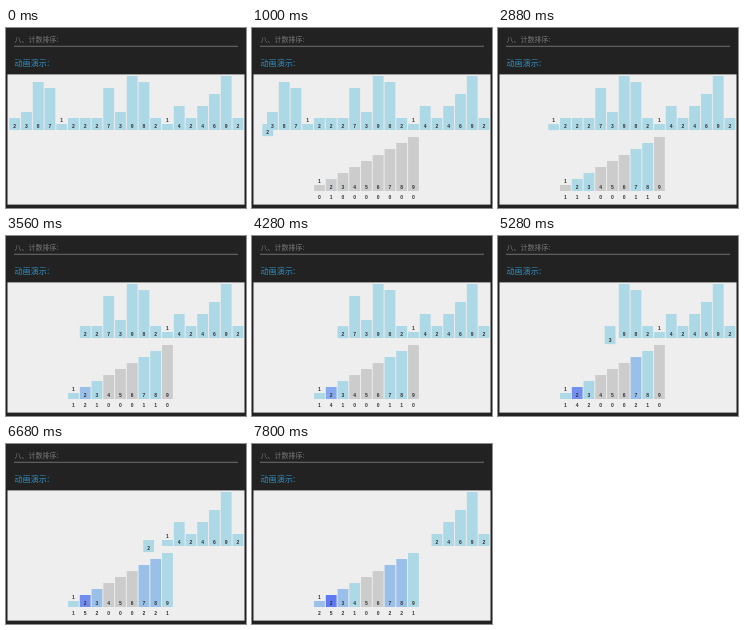
An HTML page that plays this animation: 240x180 px, repeating every 8 s.

```html
<!DOCTYPE html>
<html lang="zh">
<head>
<meta charset="utf-8">
<title>计数排序</title>
<style>
  html, body { margin: 0; width: 100%; height: 100%; overflow: hidden; background: #222; }
  svg { display: block; width: 100%; height: 100%; }
  text { font: bold 5px "Liberation Sans", sans-serif; fill: #333; text-anchor: middle; }
  .head { font-family: "Noto Serif", "Noto Sans CJK SC", serif; text-anchor: start; }
  .title { font-size: 7px; font-weight: 300; fill: #7c7c7c; }
  .sub { font-size: 8.1px; font-weight: 500; fill: #3090c0; }
</style>
</head>
<body>
<svg viewBox="0 0 240 180" preserveAspectRatio="none">
  <rect width="240" height="180" fill="#222"/>
  <text class="head title" x="8.5" y="14">八、计数排序:</text>
  <rect x="8" y="17.8" width="224" height="0.9" fill="#777"/>
  <text class="head sub" x="8.5" y="38">动画演示:</text>
  <rect x="1.5" y="46.4" width="237" height="130.2" fill="#eee"/>
  <g id="bins"></g>
  <g id="bars"></g>
  <g id="labels"></g>
</svg>
<script>
const LOOP = 8000, FIRST = 934, PERIOD = 472, MOVE = 225;
const TOP = 102, BOTTOM = 163, UNIT = 6, PITCH = 11.75, BAR = 10.8;
const values = [2, 3, 8, 7, 1, 2, 2, 2, 7, 3, 9, 8, 2, 1, 4, 2, 4, 6, 9, 2];
const EMPTY = [204, 204, 204], ONE = [173, 216, 230], FULL = [0, 0, 255];

const byId = id => document.getElementById(id);
const mix = (a, b, p) => a + (b - a) * p;
const mixColor = (a, b, p) => a.map((c, i) => mix(c, b[i], p));
const slotX = i => 8.7 + PITCH * i;
const startOf = i => FIRST + PERIOD * i;

function add(parent, tag, attrs) {
  const node = document.createElementNS("http://www.w3.org/2000/svg", tag);
  for (const key in attrs) node.setAttribute(key, attrs[key]);
  return parent.appendChild(node);
}

// A bar with its value, drawn around x = 0 and standing on y = 0.
function makeBar(value, barLayer, labelLayer) {
  const height = value * UNIT;
  const rect = add(barLayer, "rect", { x: -BAR / 2, y: -height, width: BAR, height, fill: "#add8e6" });
  const label = add(labelLayer, "text", { y: value === 1 ? -height - 2.2 : -2.2 });
  label.textContent = value;
  return { value, rect, label };
}

function place(bar, x, y) {
  const move = `translate(${x} ${y})`;
  bar.rect.setAttribute("transform", move);
  bar.label.setAttribute("transform", move);
}

function ease(p) {
  p = Math.min(1, Math.max(0, p));
  return p < 0.5 ? 4 * p ** 3 : 1 - 4 * (1 - p) ** 3;
}

const progress = (t, i) => ease((t - startOf(i)) / MOVE);

const countColor = n => n < 1
  ? mixColor(EMPTY, ONE, n)
  : mixColor(ONE, FULL, (n - 1) / 9);

const bins = Array.from({ length: 9 }, (_, i) => {
  const bin = makeBar(i + 1, byId("bins"), byId("bins"));
  bin.slot = slotX(i + 5);
  place(bin, bin.slot, BOTTOM);
  bin.count = add(byId("bins"), "text", { x: bin.slot, y: 171.2 });
  return bin;
});
const bars = values.map(v => makeBar(v, byId("bars"), byId("labels")));

// The motion is sampled about seven times a second; each sample appears on a 40 ms grid.
function held(t) {
  const step = 141.6, lead = 8.6, grid = 40;
  const pose = Math.floor((Math.floor(t / grid) * grid - lead) / step);
  return Math.max(0, pose * step + lead);
}

function draw(t) {
  byId("bins").setAttribute("opacity", progress(t, -1));

  bars.forEach((bar, i) => {
    const p = progress(t, i);
    const shown = p < 1 ? "visible" : "hidden";
    bar.rect.setAttribute("visibility", shown);
    bar.label.setAttribute("visibility", shown);
    place(bar, mix(slotX(i), bins[bar.value - 1].slot, p), mix(TOP, BOTTOM, p));
  });

  for (const bin of bins) {
    let count = 0, shade = 0;
    values.forEach((v, i) => {
      if (v !== bin.value || t < startOf(i)) return;
      count++;
      shade += progress(t, i);
    });
    bin.count.textContent = count;
    bin.rect.setAttribute("fill", `rgb(${countColor(shade).map(Math.round)})`);
  }
}

const begin = performance.now();
function tick() {
  draw(held((performance.now() - begin) % LOOP));
  requestAnimationFrame(tick);
}
tick();
</script>
</body>
</html>
```
